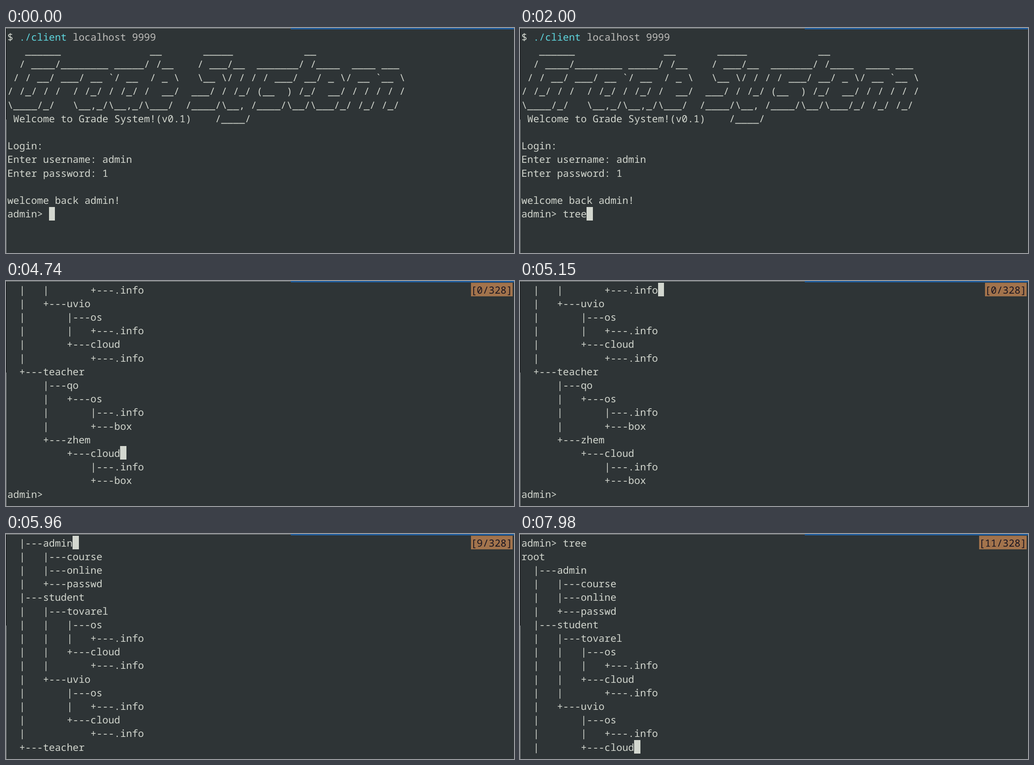
Animation of 1122x499 px, one loop 8 s. Source, as an HTML page with a canvas:

```html
<!DOCTYPE html>
<html lang="en">
<head>
<meta charset="utf-8">
<title>Grade system terminal</title>
<style>
  html, body { margin: 0; width: 100%; height: 100%; overflow: hidden; background: #2e3436; }
  canvas { display: block; }
</style>
</head>
<body>
<canvas id="stage" width="1122" height="499"></canvas>

<script type="text/plain" id="login">
$
   ______               __       _____            __
  / ____/________ _____/ /__    / ___/__  _______/ /____  ____ ___
 / / __/ ___/ __ `/ __  / _ \   \__ \/ / / / ___/ __/ _ \/ __ `__ \
/ /_/ / /  / /_/ / /_/ /  __/  ___/ / /_/ (__  ) /_/  __/ / / / / /
\____/_/   \__,_/\__,_/\___/  /____/\__, /____/\__/\___/_/ /_/ /_/
 Welcome to Grade System!(v0.1)    /____/

Login:
Enter username: admin
Enter password: 1

welcome back admin!
</script>

<script type="text/plain" id="tree">
admin> tree
root
  |---admin
  |   |---course
  |   |---online
  |   +---passwd
  |---student
  |   |---tovarel
  |   |   |---os
  |   |   |   +---.info
  |   |   +---cloud
  |   |       +---.info
  |   +---uvio
  |       |---os
  |       |   +---.info
  |       +---cloud
  |           +---.info
  +---teacher
      |---qo
      |   +---os
      |       |---.info
      |       +---box
      +---zhem
          +---cloud
              |---.info
              +---box
</script>

<script>
const LOOP = 8000, ROWS = 16, COLS = 85, HISTORY = 328;
const CELL_W = 13.125, CELL_H = 30.2, LEFT = 3, TOP = 4, BASELINE = 23.5;
const FG = '#d3d7cf', BG = '#2e3436';
const PROMPT = 'admin> ';

const readLines = id => document.getElementById(id).textContent.slice(1, -1).split('\n');
const loginLines = readLines('login');
const treeLines = [...readLines('tree'), PROMPT];
const lastTop = treeLines.length - ROWS;

const ctx = document.getElementById('stage').getContext('2d', { alpha: false });

// Times in ms
const TYPED = [1600, 1730, 1930, 2000];
const OUTPUT = 2390, COPY_MODE = 3880;
const HIDDEN = [[70, 670], [2990, 3540], [6750, 7100]];
const SCROLL = [[5210, 1], [5350, 4], [5430, 6], [5630, 7], [5750, 8], [5960, 9], [6090, 10], [6230, 11]];
const CURSOR_ROW = [[0, 15], [4280, 14],
  ...[12, 10, 8, 6, 4, 2, 0].map((row, i) => [4740 + i * 410 / 6, row]),
  [7150, 1],
  ...[3, 5, 7, 9, 12, 15].map(row => [7620 + (row - 3) * 30, row])];

// Value of the latest step reached at time t
const valueAt = (steps, t, start = 0) =>
  steps.reduce((value, [time, next]) => t >= time ? next : value, start);

const cellX = col => LEFT + col * CELL_W;
const cellY = row => TOP + row * CELL_H;

function fill(color, x, y, w, h) {
  ctx.fillStyle = color;
  ctx.fillRect(x, y, w, h);
}

function write(text, col, row, color = FG) {
  ctx.fillStyle = color;
  ctx.fillText(text, cellX(col), cellY(row) + BASELINE);
}

function fillCells(color, col, row, count) {
  const x = Math.round(cellX(col)), y = Math.round(cellY(row));
  fill(color, x, y, Math.round(cellX(col + count)) - x, 30);
}

function drawWindow() {
  fill(BG, 0, 0, 1122, 499);
  fill('#0c0e0f', 0, 0, 1, 203);
  fill('#8b8f8f', 0, 203, 1, 296);
  fill('#8b8f8f', 0, 0, 629, 1);
  fill('#215d9c', 629, 0, 493, 3);
}

function drawLogin(t) {
  const input = PROMPT + 'tree'.slice(0, TYPED.filter(time => t >= time).length);
  const lines = [...loginLines, input];
  lines.forEach((line, row) => write(line, 0, row));
  write('./client', 2, 0, '#5fd7df');
  write('localhost 9999', 11, 0, '#c0bfbc');
  return { col: input.length, row: lines.length - 1 };
}

function drawTree(t) {
  const scroll = valueAt(SCROLL, t);
  const lines = treeLines.slice(lastTop - scroll, lastTop - scroll + ROWS);
  lines.forEach((line, row) => write(line, 0, row));
  if (t >= COPY_MODE) {
    const badge = `[${scroll}/${HISTORY}]`, col = COLS - badge.length;
    fillCells('#a2734c', col, 0, badge.length);
    write(badge, col, 0, '#171421');
  }
  const row = valueAt(CURSOR_ROW, t);
  return { col: lines[row].length, row };
}

function draw(t) {
  ctx.font = '21.875px "Noto Sans Mono", monospace';
  ctx.textRendering = 'geometricPrecision';
  drawWindow();
  const cursor = t < OUTPUT ? drawLogin(t) : drawTree(t);
  if (!HIDDEN.some(([from, to]) => t >= from && t < to)) fillCells(FG, cursor.col, cursor.row, 1);
}

const start = performance.now();
function frame() {
  draw((performance.now() - start) % LOOP);
  requestAnimationFrame(frame);
}
frame();
</script>
</body>
</html>
```
